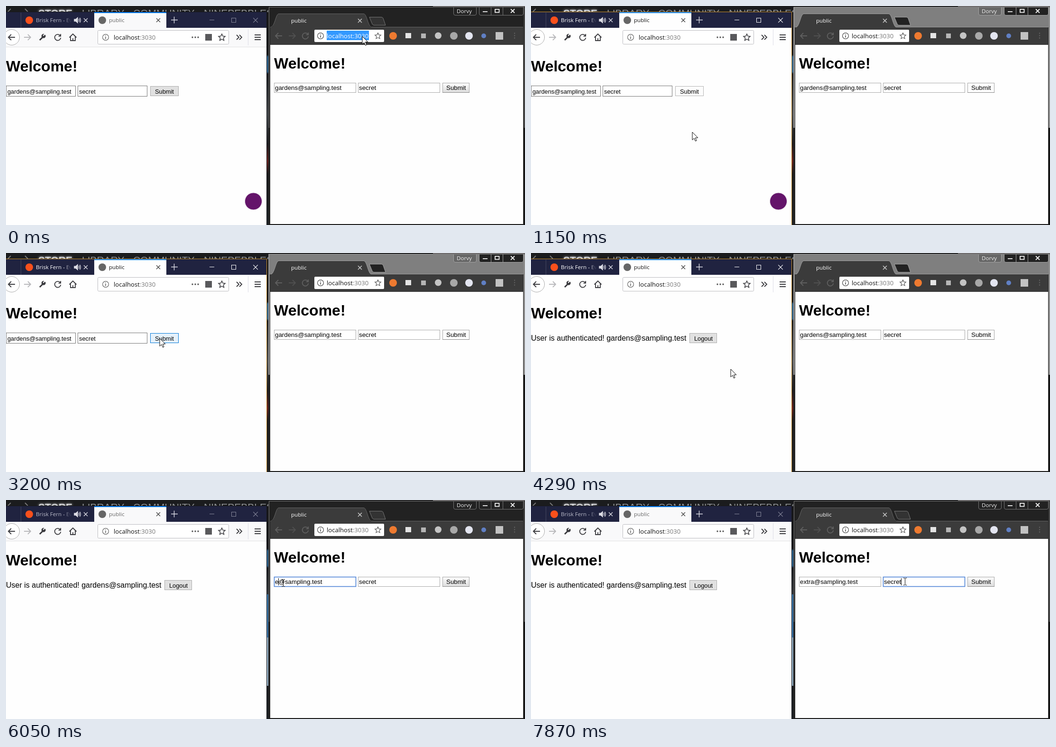
Animation, 1094 px wide and 462 px high, one loop 7990 ms. Source, as an HTML page:

```html
<!DOCTYPE html>
<html lang="en">
<head>
<meta charset="utf-8">
<title>Two browsers</title>
<style>
  html, body { margin: 0; width: 100%; height: 100%; overflow: hidden; background: #1b1c1e; }
  svg { display: block; width: 100%; height: 100%;
    --frame: #222; --edge: #777; --chip: #222; --newTab: #333;
    --accent: #17181c; --bar: #f9f9fa; --rule: #e0e0e2; --tabText: #666;
    --sideText: #b9bac8; --winIcon: #85879a; --button: #e1e1e1; --buttonEdge: #adadad; --rightButton: #ddd; }
  svg.left {
    --frame: #7f7f7f; --edge: #a4a4a4; --chip: #666; --newTab: #222;
    --accent: #c98f2b; --bar: #fefefe; --rule: #fefefe; --tabText: #111;
    --sideText: #fff; --winIcon: #fff; --button: #fdfdfd; --buttonEdge: #b5b5b5; --rightButton: #fdfdfd; }
  text { white-space: pre; }
  .ui { font-family: "Open Sans", "Noto Sans", sans-serif; font-size: 11.6px; }
  .tab { font-weight: 500; }
  .url { font-size: 13.1px; fill: #111; }
  .page { font-family: "Liberation Sans", Arial, sans-serif; }
  .small { font-size: 12.8px; }
  .form { font-size: 13.333px; }
  .glow { text-shadow: 0 0 5px #bbb; }
  .line { fill: none; stroke: currentColor; }
  .field { fill: #fff; stroke: #777; }
  .right .field { stroke: #a9a9a9; }
  #leftEmail.hover { stroke: #222; }
  .right .field.focus { stroke: #4d83d6; stroke-width: 1.6; }
  #submit { fill: var(--button); stroke: var(--buttonEdge); }
  #submit.hover { fill: #e5f1fb; stroke: #0078d7; }
  #submit.press { fill: #cce4f7; stroke: #005499; }
</style>
</head>
<body>
<svg id="stage" viewBox="0 0 1094 462" preserveAspectRatio="none">
  <defs>
    <linearGradient id="gap" x2="0" y2="1">
      <stop offset="0" stop-color="#17181a"/><stop offset=".2" stop-color="#17181a"/>
      <stop offset=".21" stop-color="#2d628c"/><stop offset=".28" stop-color="#2d628c"/>
      <stop offset=".29" stop-color="#1a1c20"/><stop offset=".48" stop-color="#44484c"/>
      <stop offset=".62" stop-color="#1c1c20"/><stop offset=".7" stop-color="#6b2220"/>
      <stop offset=".76" stop-color="#1a1a1c"/><stop offset="1" stop-color="#202428"/>
    </linearGradient>
    <linearGradient id="sheen" x2="0" y2="1">
      <stop offset="0" stop-color="#fbfbfb"/><stop offset="1" stop-color="var(--rightButton)"/>
    </linearGradient>
    <linearGradient id="fade">
      <stop offset="0" stop-color="#202340" stop-opacity="0"/><stop offset="1" stop-color="#202340"/>
    </linearGradient>
    <path id="x" d="M-4-4 4 4M4-4-4 4"/>
    <path id="star" d="M0-7 2.1-2.4 7-1.9 3.3 1.5 4.4 6.6 0 4-4.4 6.6-3.3 1.5-7-1.9-2.1-2.4Z"/>
    <path id="reload" d="M5.2-3.6A6.4 6.4 0 1 0 6.4 1M6.2-7V-2.4H1.6"/>
    <path id="back" d="M7 0H-7M-1-6-7 0-1 6"/>
    <g id="info"><circle r="6.4"/><path d="M0-1V3.6M0-3.8V-2.4" stroke-width="1.6"/></g>
  </defs>

  <!-- desktop behind both windows -->
  <rect width="1094" height="462" fill="#1b1c1e"/>
  <g class="page" font-size="21" fill="#8f9194">
    <path class="line" color="#777" stroke-width="2" d="M10 6 4 12M40 6 46 12"/>
    <text class="glow" x="68" y="22" font-weight="bold" fill="#d6d7d9">STORE</text>
    <text x="160" y="22">LIBRARY</text><text x="268" y="22">COMMUNITY</text><text x="417" y="22">NINEPEBBLES</text>
  </g>
  <rect x="549" y="13" width="5" height="449" fill="url(#gap)"/>
  <g id="gapLate"><rect x="549" y="199" width="4" height="91" fill="#3b74a6"/><rect x="549" y="290" width="4" height="102" fill="#8fa9bd"/></g>

  <!-- left window -->
  <g>
    <rect y="12" width="549" height="450" fill="#fefefe"/>
    <rect y="12" width="549" height="34" fill="#202340"/>
    <path class="line" style="color:var(--accent)" d="M0 12.500H549.500V462"/>
    <path d="M31.5 14V46" stroke="#44475f"/>
    <circle cx="49" cy="30" r="8" fill="#f9501c"/>
    <text class="ui tab" x="63" y="34" fill="var(--sideText)">Brisk Fern - Ev</text>
    <rect x="122" y="18" width="16" height="24" fill="url(#fade)"/>
    <rect x="138" y="18" width="46" height="24" fill="#202340"/>
    <g class="line" color="#dcdce4" stroke-width="1.4">
      <path d="M144 28H147L151 24.5V35.5L147 32H144Z" fill="#dcdce4"/>
      <path d="M153.5 27Q155.5 30 153.5 33M155.5 25Q159 30 155.5 35"/>
      <use href="#x" x="168" y="30"/>
      <path d="M348 29.500H362M354.500 22.500V36.500"/>
    </g>
    <rect x="186" y="13" width="152" height="33" fill="var(--bar)"/>
    <rect x="186" y="13" width="152" height="2" fill="#0a84ff"/>
    <circle cx="203" cy="30" r="8" fill="#666"/>
    <text class="ui tab" x="217" y="34" fill="var(--tabText)">public</text>
    <use href="#x" class="line" color="#444" stroke-width="1.4" x="321" y="30"/>
    <g class="line" style="color:var(--winIcon)">
      <path d="M429 29.500H439"/><rect x="475.500" y="25.500" width="9" height="9"/>
      <use href="#x" transform="translate(526 30) scale(1.2)"/>
    </g>

    <rect y="46" width="549" height="40" fill="var(--bar)"/>
    <rect y="86" width="549" height="1" fill="var(--rule)"/>
    <g class="line" color="#3b3b3f" stroke-width="1.8">
      <circle cx="12" cy="66" r="16.500" fill="#fff" stroke="#aaa" stroke-width="1"/>
      <use href="#back" x="12" y="66"/>
      <use href="#back" transform="translate(45 66) scale(-1 1)" color="#b8b8bb"/>
      <path d="M71 72 77 66" stroke-width="3"/>
      <path d="M82 60.500 79 63.500 77.500 62 80.500 59A4.500 4.500 0 1 0 83.500 62Z" fill="#3b3b3f" stroke="none"/>
      <use href="#reload" x="109" y="66"/>
      <path d="M133.500 66.500 141 59 148.500 66.500M136 65V73H146V65M141 73V68"/>
      <path d="M486 61 491 66 486 71M492 61 497 66 492 71"/>
      <path d="M524 61H537M524 66H537M524 71H537"/>
      <path d="M510.500 49V83" stroke="#dcdce6" stroke-width="1"/>
      <rect x="193.500" y="51.500" width="276" height="29" rx="2" fill="#fff" stroke="#bcbcc0" stroke-width="1"/>
      <use href="#info" x="210" y="66" color="#666" stroke-width="1.2"/>
      <use href="#star" x="455" y="66" stroke-width="1.500"/>
      <path d="M393 66H408" stroke="#555" stroke-width="3.400" stroke-dasharray="0 6" stroke-linecap="round"/>
    </g>
    <rect x="420" y="59" width="14" height="14" fill="#59595c"/>
    <text class="ui url" x="227" y="71">localhost<tspan fill="#777">:3030</tspan></text>

    <g class="page">
      <text x="0" y="138" font-size="32" font-weight="bold">Welcome!</text>
      <g id="signedOut" class="small">
        <rect id="leftEmail" class="field" x=".5" y="168.500" width="146" height="22"/>
        <rect class="field" x="151.500" y="168.500" width="146" height="22"/>
        <text x="3" y="185">gardens@sampling.test</text><text x="154" y="185">secret</text>
        <rect id="submit" x="304.500" y="169.500" width="59" height="20"/>
        <text x="314" y="185">Submit</text>
      </g>
      <g id="signedIn">
        <text x="0" y="185" font-size="16">User is authenticated! gardens@sampling.test</text>
        <rect x="334.500" y="169.500" width="57" height="20" fill="#e1e1e1" stroke="#adadad"/>
        <text class="small" x="344" y="185">Logout</text>
      </g>
    </g>
    <circle id="badge" cx="521.500" cy="412" r="18" fill="#64146a" stroke="#e6dfe8"/>
  </g>

  <!-- right window -->
  <g class="right">
    <rect x="900" width="194" height="1" fill="#b9b3b6"/>
    <rect x="553" y="1" width="541" height="461" fill="#161616"/>
    <rect x="553" y="2" width="541" height="255" fill="var(--frame)"/>
    <path class="line" style="color:var(--edge)" d="M554.500 257V2.500H1092.500V257"/>
    <path d="M554.500 257V461" stroke="#333"/>
    <path d="M557 45H559C566 45 568 17 575 17H754C761 17 763 45 770 45H1090V82H557Z" fill="#3b3b3b"/>
    <path class="line" style="color:var(--edge)" stroke-width=".8" d="M557 44.500C567 45 568 16.500 575 16.500H754C761 16.500 763 45 771 44.500H1090"/>
    <path d="M766 23.500H791Q794 23.500 795 26L800 40.500H776Q773 40.500 772 38Z" fill="var(--newTab)" stroke="var(--edge)"/>
    <text class="ui tab" x="601" y="35" fill="#fff">public</text>
    <use href="#x" class="line" color="#ccc" stroke-width="1.500" x="746" y="31"/>
    <g stroke="var(--edge)">
      <path fill="var(--chip)" d="M943.500 2.500H991.500V16Q991.500 19.500 988 19.500H947Q943.500 19.500 943.500 16Z"/>
      <path fill="#222" d="M997.500 2.500H1090.500V16Q1090.500 19.500 1087 19.500H1001Q997.500 19.500 997.500 16ZM1022.500 3V19M1047.500 3V19"/>
    </g>
    <text class="ui tab" x="950" y="15" fill="#eee">Dorvy</text>
    <g class="line" color="#f2f2f2" stroke-width="1.800">
      <path d="M1005 12H1015"/><rect x="1031" y="7" width="8.500" height="6.500"/><use href="#x" x="1068" y="10.500"/>
    </g>

    <g class="line" color="#606060" stroke-width="1.800">
      <use href="#back" x="575" y="63"/><use href="#back" transform="translate(603 63) scale(-1 1)" color="#505050"/>
      <use href="#reload" x="631" y="63"/>
      <path d="M1072 57.500V70" stroke-width="2.600" stroke-dasharray="0 5" stroke-linecap="round"/>
    </g>
    <rect x="650" y="50" width="147" height="26" rx="2" fill="#fff"/>
    <g class="line" color="#555" stroke-width="1.300"><use href="#info" x="663" y="63"/><use href="#star" transform="translate(784 63) scale(.9)"/></g>
    <text class="ui url" x="676" y="68">localhost<tspan fill="#777">:3030</tspan></text>
    <g id="urlPick"><rect x="676" y="52" width="89" height="20" fill="#3399ff"/><text class="ui url" x="676" y="68" style="fill:#fff">localhost:3030</text></g>
    <circle cx="816" cy="63" r="8" fill="#ee7a30"/>
    <rect x="842" y="57" width="12" height="11" fill="#e4e4e4"/>
    <rect x="875" y="58" width="10" height="10" fill="#b5b5b5"/>
    <circle cx="911" cy="62.500" r="7" fill="#c4c4c4"/>
    <circle cx="944" cy="63" r="8" fill="#a8a8a8"/>
    <circle cx="976" cy="63" r="8" fill="#e3e5f0"/>
    <circle cx="1007" cy="63" r="5" fill="#607fc4"/>
    <rect x="1032" y="55" width="16" height="16" fill="#c2c2c2"/>

    <rect x="556" y="45" width="1" height="416" fill="#2c2c2c"/>
    <rect x="1090" y="45" width="1" height="416" fill="#2c2c2c"/>
    <rect x="557" y="82" width="533" height="378" fill="#fefefe"/>
    <g class="page form">
      <text x="565" y="132" font-size="32" font-weight="bold">Welcome!</text>
      <rect id="email" class="field" x="565.500" y="162.500" width="172" height="20"/>
      <rect id="password" class="field" x="742.500" y="162.500" width="172" height="20"/>
      <rect id="pick" x="567" y="165" height="15" fill="#3297fd"/>
      <text id="emailText" x="567" y="177"><tspan id="user"></tspan><tspan>@sampling.test</tspan></text>
      <text x="744" y="177">secret</text>
      <rect x="920.500" y="162.500" width="56" height="20" fill="url(#sheen)" stroke="#a6a6a6"/>
      <path d="M920 182.500H977" stroke="#858585"/>
      <text x="928" y="177">Submit</text>
      <rect id="caret" y="165" width="1" height="15"/>
    </g>
  </g>

  <g id="pointer">
    <path id="arrow" d="M0 0V16.500L3.900 13 6.500 19 9 18 6.500 12H11.800Z" fill="#fff" stroke="#000"/>
    <path id="beam" class="line" color="#111" d="M-3-7.500H-1L.5-6.500 2-7.500H4M.5-6.500V6.500M-3 7.500H-1L.5 6.500 2 7.500H4"/>
  </g>
</svg>
<script>
  const LOOP = 7990;
  const el = {};
  document.querySelectorAll('[id]').forEach(node => el[node.id] = node);

  // Pointer moves: first step, last step, step count, destination.
  const moves = [
    [120, 1150, 9, 340, 266],
    [1300, 1730, 4, 60, 181],
    [2160, 2650, 5, 324, 180],
    [3880, 4290, 4, 421, 245],
    [4440, 4710, 3, 630, 240],
    [4860, 5010, 2, 584, 175],
    [7210, 7470, 3, 700, 208],
    [7600, 7740, 2, 788, 172]
  ];

  function pointerAt(t) {
    let x = 751, y = 64;
    for (const [start, end, steps, toX, toY] of moves) {
      if (t < start) break;
      const step = Math.floor((t - start) / (end - start) * (steps - 1) + 1e-6) + 1;
      const part = Math.min(1, step / steps);
      x += (toX - x) * part;
      y += (toY - y) * part;
    }
    return { x, y };
  }

  const during = (t, from, to = LOOP) => t >= from && t < to;
  const show = (node, on) => node.style.display = on ? '' : 'none';
  const inside = ({ x, y }, left, top, width, height) =>
    x >= left && x <= left + width && y >= top && y <= top + height;

  function userAt(t) {
    if (t < 6050) return 'gardens';
    return 'extra'.slice(0, t < 6200 ? 1 : t < 6350 ? 3 : 5);
  }

  function draw(t) {
    const p = pointerAt(t);
    const signedIn = t >= 3760;
    const overEmail = !signedIn && inside(p, 0, 168, 147, 23);
    const overText = overEmail || !signedIn && inside(p, 151, 168, 147, 23) ||
      inside(p, 565, 162, 173, 21) || inside(p, 742, 162, 173, 21);

    el.stage.classList.toggle('left', during(t, 1020, 5130));
    show(el.urlPick, t < 1020);
    show(el.gapLate, t >= 5130);
    show(el.signedOut, !signedIn);
    show(el.signedIn, signedIn);
    el.leftEmail.classList.toggle('hover', overEmail);
    el.submit.classList.toggle('hover', inside(p, 304, 169, 60, 21));
    el.submit.classList.toggle('press', during(t, 2920, 3200));
    el.badge.style.opacity = t < 2920 ? 1 : t < 3060 ? .65 : t < 3200 ? .3 : 0;

    const user = userAt(t);
    const picked = during(t, 5280, 6050);
    if (el.user.textContent !== user) el.user.textContent = user;
    const userWidth = el.emailText.getSubStringLength(0, user.length);
    el.user.style.fill = picked ? '#fff' : '';
    show(el.pick, picked);
    el.pick.setAttribute('width', userWidth);

    el.email.classList.toggle('focus', during(t, 5130, 7870));
    el.password.classList.toggle('focus', t >= 7870);
    show(el.caret, during(t, 5130, 5280) || during(t, 6050, 6910) || during(t, 7410));
    el.caret.setAttribute('x', t < 6050 ? 586 : t < 7870 ? Math.round(567 + userWidth) : 780);

    el.pointer.setAttribute('transform', `translate(${Math.round(p.x)} ${Math.round(p.y)})`);
    show(el.arrow, !overText);
    show(el.beam, overText);
  }

  const begin = performance.now();
  function tick() {
    draw((performance.now() - begin) % LOOP);
    requestAnimationFrame(tick);
  }
  tick();
</script>
</body>
</html>
```
